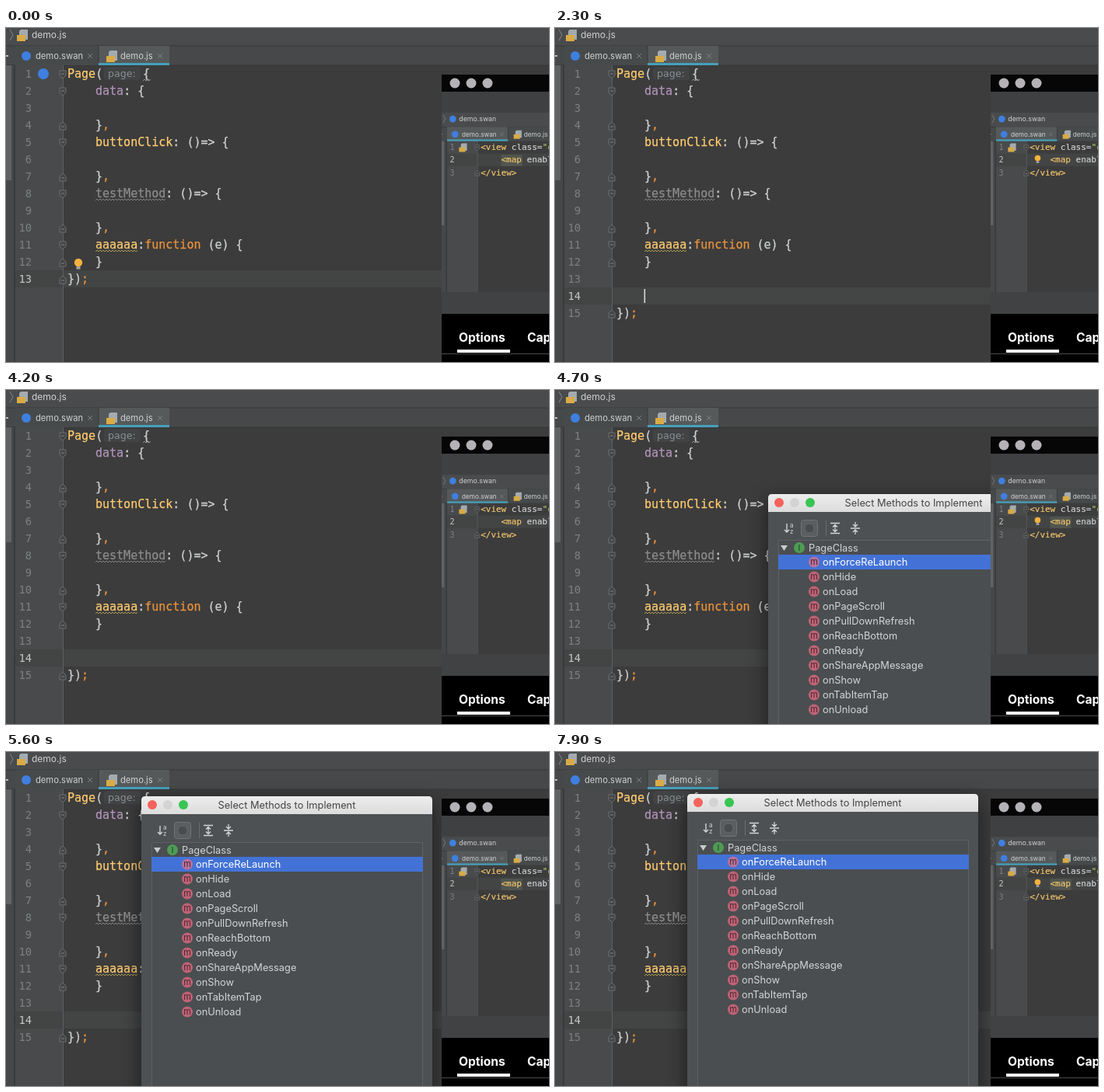
An HTML page that plays this animation: 698 px wide and 430 px high, repeating every 8 s.

```html
<!DOCTYPE html>
<html lang="en">
<head>
<meta charset="utf-8">
<title>Editor demo</title>
<style>
html, body { margin: 0; width: 100%; height: 100%; overflow: hidden; background: #3c3c3c; }
svg { display: block; }
text { white-space: pre; }
.code { font: 15px "DejaVu Sans Mono", monospace; stroke-width: .25px; }
.num { font: 13.8px "DejaVu Sans Mono", monospace; }
.hint { font: 12.6px "DejaVu Sans", sans-serif; }
.ui { font-family: Inter, sans-serif; }
</style>
</head>
<body>
<svg id="stage" width="698" height="430" viewBox="0 0 698 430">
  <defs>
    <clipPath id="miniClip"><rect x="560" y="82" width="138" height="258"/></clipPath>
    <linearGradient id="title" x2="0" y2="1"><stop stop-color="#ededed"/><stop offset="1" stop-color="#dcdcdc"/></linearGradient>
    <filter id="blur" x="-30%" y="-30%" width="160%" height="160%"><feGaussianBlur stdDeviation="13"/></filter>
  </defs>
  <g id="main"></g>
  <g id="dialog"></g>
  <g id="frame"></g>
  <g clip-path="url(#miniClip)"><g id="mini" transform="translate(558.2 110.5) scale(.732)"></g></g>
</svg>
<script>
const LOOP = 8000, ROW = 22;
const INK = { w: '#cfd1d3', y: '#ffcb70', p: '#b294bb', g: '#8c8c8c', o: '#e8923c', t: '#f2c56c', s: '#a5c261' };
const $ = id => document.getElementById(id);
const rowY = n => 59 + (n - 1) * ROW;

const rect = (x, y, w, h, fill, more = '') => `<rect x="${x}" y="${y}" width="${w}" height="${h}" fill="${fill}" ${more}/>`;
const dot = (x, y, r, fill, more = '') => `<circle cx="${x}" cy="${y}" r="${r}" fill="${fill}" ${more}/>`;
const path = (d, stroke, w = 1, fill = 'none') => `<path d="${d}" stroke="${stroke}" stroke-width="${w}" fill="${fill}"/>`;
const esc = s => s.replace(/</g, '&lt;').replace(/>/g, '&gt;');
const label = (x, y, s, size, fill, more = '') =>
  `<text class="ui" x="${x}" y="${y}" font-size="${size}" fill="${fill}" ${more}>${esc(s)}</text>`;

// A code row: each part is an ink letter followed by its text
const code = (x, y, ...parts) => `<text class="code" x="${x}" y="${y + 5}">` +
  parts.map(p => `<tspan fill="${INK[p[0]]}" stroke="${INK[p[0]]}">${esc(p.slice(1))}</tspan>`).join('') + '</text>';

function wave(x, y, w, color) {
  let d = `M${x} ${y}`;
  for (let i = 2; i <= w; i += 2) d += `L${x + i} ${y + (i % 4 ? -2 : 0)}`;
  return path(d, color, .9);
}

const appMark = (x, y, r = 6) => dot(x, y, r, '#3f7fe0');
const jsFile = (x, y) => path(`M${x - 3} ${y - 7}h9v13h-11v-11z`, 'none', 0, '#a3abb0') +
  rect(x - 8, y, 11, 8, '#d9ab45');
const bulb = (x, y) => dot(x, y - 1, 5.2, '#f4b13e') + rect(x - 2.5, y + 4.2, 5, 3.3, '#a7a7a7');
const cross = (x, y) => path(`M${x - 3} ${y - 3}l6 6m0-6l-6 6`, '#7d8184');

function fold(x, n, up) {
  const y = rowY(n) + 1, k = up ? -1 : 1;
  return path(`M${x - 4} ${y - 5 * k}h8v${6 * k}l-4 ${4 * k}l-4 ${-4 * k}z`, '#6c6f71', 1, '#424446') +
    path(`M${x - 2} ${y - k}h4`, '#828587');
}

function jsBody(blank) {
  const end = 13 + blank, x = 79, tab = 115;
  const row = (n, ...parts) => code(tab, rowY(n), ...parts);
  let s = code(x, rowY(1), 'yPage', 'w(') +
    rect(126, 50, 47, 17, '#414344', 'rx="4"') +
    `<text class="hint" x="131" y="63" fill="#8b8f92">page:</text>` +
    code(176, rowY(1), 'w{') + wave(176, 68, 10, '#9a9a9a') +
    row(2, 'pdata', 'w: {') + row(5, 'ybuttonClick', 'w: ()=> {') +
    row(8, 'gtestMethod', 'w: ()=> {') + wave(115, 222, 90, '#8c8c8c') +
    row(11, 'yaaaaaa', 'w:', 'ofunction', 'w (e) {') + wave(115, 288, 54, '#b9a45a') +
    row(12, 'w}') + code(x, rowY(end), 'w})', 'o;');
  for (const n of [4, 7, 10]) s += row(n, 'w}', 'o,');
  for (const n of [1, 2, 5, 8, 11]) s += fold(73, n, false);
  for (const n of [4, 7, 10, 12, end]) s += fold(73, n, true);
  return s;
}

function swanBody(lit) {
  return (lit ? rect(107, rowY(2) - 9, 37, 20, '#52564f') : '') +
    code(71, rowY(1), 't<view', 'w class=', 's"c') +
    code(107, rowY(2), 't<map', 'w enable') +
    code(71, rowY(3), 't</view>') + fold(65, 1, false) + fold(65, 3, true);
}

// Whole editor window with crumbs, tabs, gutter and code
function editor(o) {
  const js = o.file === 'js', gut = js ? 73 : 65, cur = rowY(o.current);
  let s = rect(0, -40, 700, 470, '#3c3c3c') + rect(0, -40, 700, 38, '#3e4041') +
    rect(0, -2, 700, 25, '#494b4c') + rect(0, 23, 700, 25, '#464849') + rect(0, 22.5, 700, 1, '#38393a') +
    rect(0, 47.5, 700, 1, '#353637') +
    rect(0, 48, 11, 390, '#454748') + rect(0, 48, 7, 148, '#606263') + rect(10, 48, 1.5, 390, '#383a3b') +
    rect(12, 48, gut - 12, 390, '#484a4b') +
    rect(12, cur - 11, 700, ROW, '#434444') + rect(gut, 48, 1, 390, '#5c5f61') +
    rect(12, 23, 107, 25, js ? '#474a4b' : '#56595a') + rect(119, 23, 91, 25, js ? '#56595a' : '#474a4b') +
    rect(js ? 119 : 12, 45, js ? 91 : 107, 3, '#46a0ba') + rect(118.5, 23, 1, 22, '#38393a') +
    rect(0, 35, 3, 1.8, '#c8cacb') +
    path('M5 2l4 7l-4 7', '#85888a') +
    (js ? jsFile(22, 9) : appMark(22, 9)) +
    label(33, 13, js ? 'demo.js' : 'demo.swan', 12, '#cfd1d2') +
    appMark(26, 36) + label(38, 40, 'demo.swan', 11.2, '#cfd1d2') + cross(108, 36) +
    jsFile(137, 36) + label(147, 40, 'demo.js', 11.2, '#cfd1d2') + cross(198, 36);
  for (let n = 1; n <= o.count; n++)
    s += `<text class="num" x="${js ? 33 : 25}" y="${rowY(n) + 5}" text-anchor="end" fill="${n === o.current ? '#c4c6c8' : '#7e8183'}">${n}</text>`;
  s += js ? jsBody(o.count - 13) : swanBody(o.lit);
  if (o.mark) s += js ? appMark(48, 59, 7) : jsFile(41, 59);
  if (o.bulb) s += js ? bulb(93, rowY(o.bulb) + 2) : bulb(85, 79);
  if (o.caret) s += rect(o.caret, cur - 9, 1.6, 18, '#d8d8d8');
  return s;
}

function dialog() {
  const ink = '#d3d5d6';
  const names = 'ForceReLaunch Hide Load PageScroll PullDownRefresh ReachBottom Ready ShareAppMessage Show TabItemTap Unload'.split(' ');
  const badge = (x, y, c, ch, tint) => dot(x, y, 7, c) +
    label(x, y + 3.8, ch, 11, tint, 'text-anchor="middle"');
  let s = rect(0, 8, 374, 420, '#000', 'opacity=".55" filter="url(#blur)"') +
    rect(0, 0, 374, 440, '#4d5153', 'rx="5"') +
    path('M0 23V5q0-5 5-5h364q5 0 5 5v18z', 'none', 0, 'url(#title)') +
    dot(14, 11, 6, '#f4625b') + dot(34, 11, 6, '#d3d3d3') + dot(54, 11, 6, '#38c552') +
    label(187, 16, 'Select Methods to Implement', 12.8, '#444', 'text-anchor="middle"') +
    path('M24 38v11m-3-3l3 3l3-3', ink, 1.4) +
    label(28, 43, 'a', 8, ink) + label(28, 51, 'z', 8, ink) +
    rect(42.5, 33.5, 21, 21, '#5a5e60', 'rx="3" stroke="#707476"') + dot(53, 44, 6, '#494c4e', 'stroke="#64686a"') +
    rect(74, 34, 1, 20, '#686c6e') +
    path('M80 37.5h12M80 50.5h12M86 39.5v9m-3-6l3-3l3 3m-6 3l3 3l3-3', ink, 1.3) +
    path('M106 44h12M112 36v6m-3-3l3 3l3-3M112 52v-6m-3 3l3-3l3 3', ink, 1.3) +
    rect(13.5, 59.5, 348, 390, '#4a4e50', 'stroke="#5d6163"') +
    path('M16 66h9l-4.5 7z', 'none', 0, '#c8cacb') +
    badge(40, 69, '#4f9b55', 'I', '#23402a') + label(52, 73.5, 'PageClass', 12.8, ink) +
    rect(13, 78, 349, 19, '#4372d7');
  names.forEach((n, i) => {
    const y = 87.5 + i * 19;
    s += badge(59, y, i ? '#bd6375' : '#b8719c', 'm', '#4c2630') + label(70, y + 4.5, 'on' + n, 12.8, i ? ink : '#fff');
  });
  return s;
}

function frame() {
  let s = rect(560, 60, 138, 22, '#060606') + rect(560, 340, 138, 28, '#404243') +
    rect(560, 339, 138, 1, '#38393a') + rect(560, 368, 138, 62, '#000') +
    label(582, 403.5, 'Options', 15.6, '#fff', 'font-weight="700"') +
    label(670, 403.5, 'Cap', 15.6, '#fff', 'font-weight="700"') +
    rect(560, 419, 138, 1, '#4c4c4c') + rect(580, 414, 68, 4, '#fff');
  for (const x of [577, 598, 619]) s += dot(x, 71, 6.5, '#b4b2b7');
  return s;
}

const CLICK = 400, ENTER = [1450, 2220], OPEN = 4500;

function mainState(t) {
  const blank = ENTER.filter(e => t >= e).length;
  const clicked = t >= CLICK;
  let caret = 0;
  if (blank === 2) caret = t < 4000 && (t - ENTER[1]) % 1000 < 500 ? 114.5 : 0;
  else if (blank === 1) caret = t - ENTER[0] < 500 ? 114.5 : 0;
  else if (clicked) caret = t < 700 ? 124.5 : 0;
  return {
    file: 'js', count: 13 + blank, caret,
    current: clicked ? 12 + blank : 13,
    mark: !blank, bulb: clicked ? 0 : 12
  };
}

// The small recording: start time and view
const VIEWS = [[0, 'lit'], [1900, 'bulb'], [3230, 'js'], [4000, 'plain'], [4350, 'lit bulb'],
  [5200, 'lit'], [6350, 'js'], [7250, 'plain'], [7550, 'lit bulb']];

function miniState(t) {
  const v = VIEWS.filter(e => t >= e[0]).pop()[1];
  return v === 'js'
    ? { file: 'js', count: 13, current: 11, mark: true, bulb: 11 }
    : { file: 'swan', count: 3, current: 2, mark: true, lit: v.includes('lit'), bulb: v.includes('bulb') };
}

const keys = {};
function show(id, state) {
  const key = JSON.stringify(state);
  if (keys[id] === key) return;
  keys[id] = key;
  $(id).innerHTML = editor(state);
}

const ease = (t, a, b) => {
  const k = Math.min(1, Math.max(0, (t - a) / (b - a)));
  return k * k * (3 - 2 * k);
};

function draw(t) {
  show('main', mainState(t));
  show('mini', miniState(t));
  const a = ease(t, 4700, 5550), b = ease(t, 5600, 6000);
  const d = $('dialog');
  d.style.display = t >= OPEN ? '' : 'none';
  d.setAttribute('transform', `translate(${Math.round(274 - 100 * a - 4 * b)} ${Math.round(134 - 77 * a - 3 * b)})`);
}

$('dialog').innerHTML = dialog();
$('frame').innerHTML = frame();
const start = performance.now();
function tick() {
  draw((performance.now() - start) % LOOP);
  requestAnimationFrame(tick);
}
draw(0);
requestAnimationFrame(tick);
</script>
</body>
</html>
```
